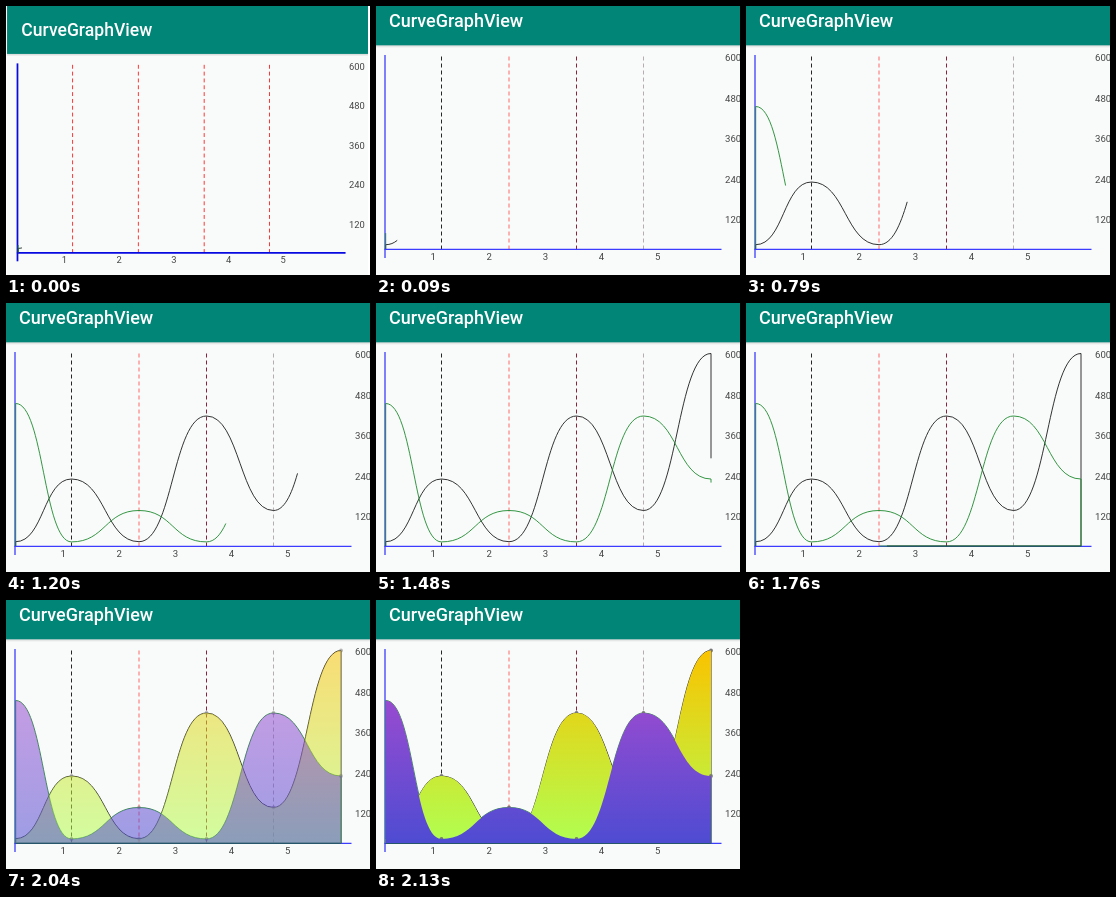
Write an HTML page that moves like this. It is 364 px wide and 269 px high and loops after 3150 ms.

```html
<!DOCTYPE html>
<html lang="en">
<head>
<meta charset="utf-8">
<title>CurveGraphView</title>
<style>
  html, body { margin: 0; width: 100%; height: 100%; overflow: hidden; background: #fff; }
  svg { display: block; width: 364px; height: 269px; }
  text { font-family: Roboto, sans-serif; font-size: 9.6px; fill: #444; }
  .title { font-size: 18px; font-weight: 500; fill: #fff; }
  .middle { text-anchor: middle; }
  .axis { stroke: #3c3cff; stroke-width: 1.3; animation: axis 3150ms step-end infinite; }
  .guide { stroke-dasharray: 4 3; animation: guide 3150ms step-end infinite; }
  .curve { fill: none; stroke-width: .9; stroke-dasharray: 1 1; animation: draw 3150ms linear infinite; }
  .late { animation: appear 3150ms linear infinite; }
  #screen { animation: zoom 3150ms step-end infinite; }

  /* The first 50 ms show the screen slightly smaller. */
  @keyframes zoom {
    0% { transform: translate(2.7px, 9.6px) scale(.975); }
    1.587%, 100% { transform: none; }
  }
  @keyframes axis {
    0% { stroke: #0808e0; stroke-width: 1.8; }
    1.587%, 100% { stroke: #3c3cff; stroke-width: 1.3; }
  }
  @keyframes guide {
    0% { stroke: #ff3030; }
    1.587%, 100% { stroke: var(--tone); }
  }
  /* Quadratic acceleration, already under way when the loop begins. */
  @keyframes draw {
    0% { stroke-dashoffset: .993; animation-timing-function: cubic-bezier(.333, .038, .667, .372); }
    59.62%, 100% { stroke-dashoffset: 0; }
  }
  @keyframes appear {
    0% { opacity: 0; }
    59.24% { opacity: 0; animation-timing-function: cubic-bezier(.333, 0, .667, .333); }
    66.83%, 100% { opacity: 1; }
  }
</style>
</head>
<body>
<svg viewBox="0 0 364 269">
  <defs>
    <linearGradient id="lime" gradientUnits="userSpaceOnUse" x1="0" y1="50" x2="0" y2="243">
      <stop stop-color="#fac300"/><stop offset="1" stop-color="#b0ff52"/>
    </linearGradient>
    <linearGradient id="violet" gradientUnits="userSpaceOnUse" x1="0" y1="100" x2="0" y2="243">
      <stop stop-color="#984bd0"/><stop offset="1" stop-color="#4e4cd2"/>
    </linearGradient>
    <linearGradient id="shadow" x2="0" y2="1">
      <stop stop-color="#000" stop-opacity=".16"/><stop offset="1" stop-color="#000" stop-opacity="0"/>
    </linearGradient>
  </defs>
  <g id="screen">
    <rect x="-1.7" y="-10" width="370.2" height="290" fill="#f9fbfa"/>
    <rect x="-1.7" y="39" width="370.2" height="3" fill="url(#shadow)"/>
    <rect x="-1.7" y="-10" width="370.2" height="49.3" fill="#008577"/>
    <text class="title" x="13" y="21.3">CurveGraphView</text>
  </g>
</svg>
<script>
  const screen = document.getElementById('screen');
  const base = 243;
  const columns = [9.7, 65.5, 133, 200.5, 267.5, 335];
  const series = [
    { heights: [238.7, 176, 238.7, 113, 207.5, 50.5], stroke: '#1c1c1c', fill: 'url(#lime)' },
    { heights: [100.5, 238.9, 207.5, 238.9, 113, 176], stroke: '#1f8a2f', fill: 'url(#violet)' }
  ];

  function add(tag, attributes, text = '') {
    const node = document.createElementNS('http://www.w3.org/2000/svg', tag);
    for (const [name, value] of Object.entries(attributes)) node.setAttribute(name, value);
    node.textContent = text;
    screen.append(node);
  }

  function curvePath(heights) {
    let d = `M${columns[0]} ${base}V${heights[0]}`;
    for (let i = 1; i < columns.length; i++) {
      const middle = (columns[i - 1] + columns[i]) / 2;
      d += `C${middle} ${heights[i - 1]} ${middle} ${heights[i]} ${columns[i]} ${heights[i]}`;
    }
    return d + `V${base}Z`;
  }

  ['#262626', '#ff6868', '#86243c', '#b5adb2'].forEach((tone, i) => {
    const x = columns[i + 1];
    add('line', { class: 'guide', style: `--tone:${tone}`, x1: x, x2: x, y1: 50.5, y2: base });
  });
  add('line', { class: 'axis', x1: 9, x2: 9, y1: 49, y2: 252 });
  add('line', { class: 'axis', x1: 8.4, x2: 345.5, y1: base + .3, y2: base + .3 });

  for (let i = 0; i < 5; i++) {
    add('text', { x: 349, y: 55.4 + i * 40.5 }, 600 - i * 120);
    add('text', { class: 'middle', x: 57.2 + i * 56.1, y: 254.2 }, i + 1);
  }

  for (const { heights, stroke } of series) {
    add('path', { class: 'curve', d: curvePath(heights), stroke, pathLength: 1 });
  }
  for (const { heights, fill } of series) {
    heights.slice(1).forEach((y, i) =>
      add('circle', { class: 'late', cx: columns[i + 1], cy: y, r: 1.9, fill: '#777' }));
    add('path', { class: 'late', d: curvePath(heights), fill });
  }
</script>
</body>
</html>
```
